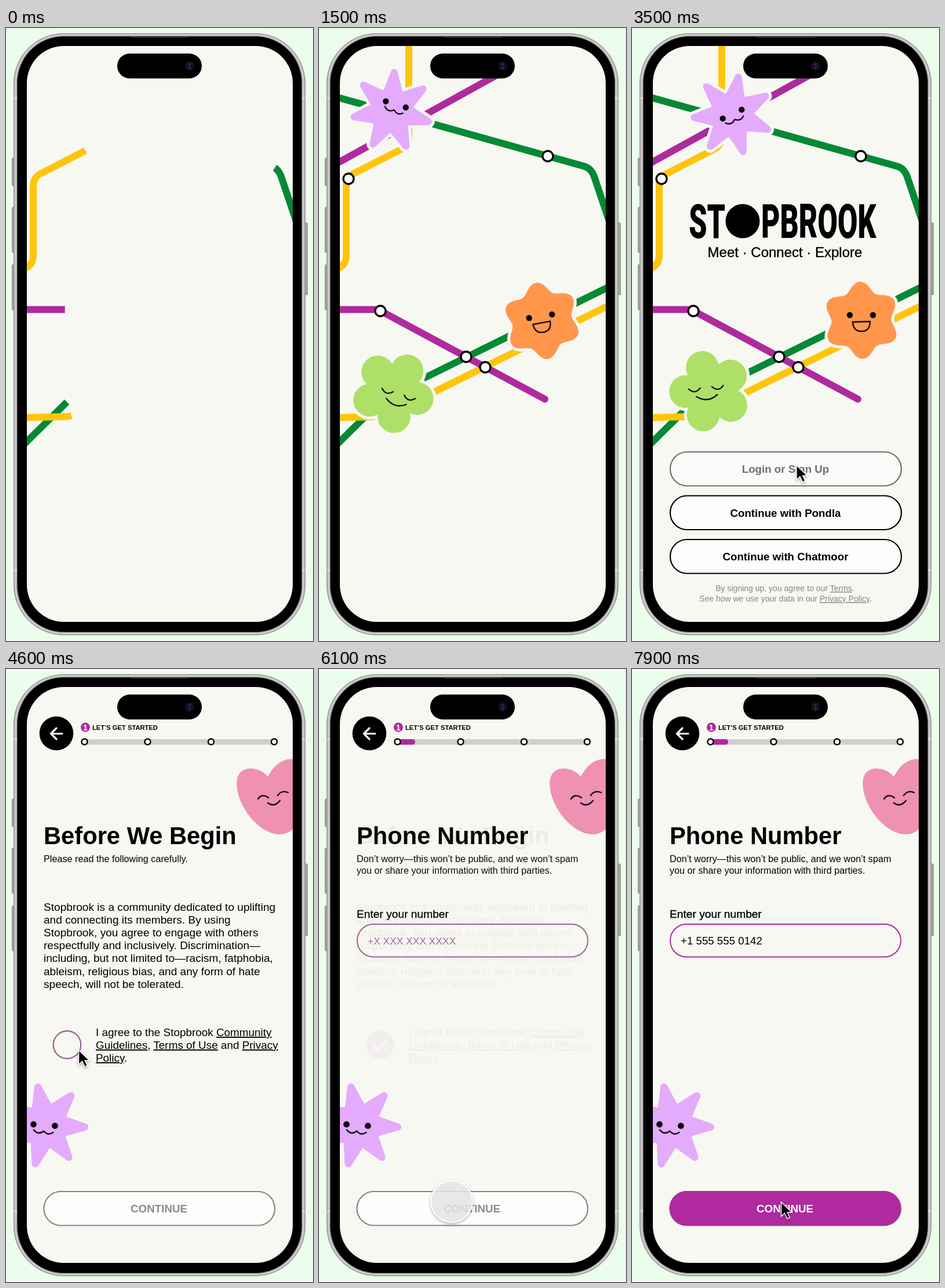
Write an HTML page that moves like this. It is 530 px wide and 1057 px high and loops after 8000 ms.

```html
<!DOCTYPE html>
<html lang="en">
<head>
<meta charset="utf-8">
<title>Onboarding</title>
<style>
html, body { margin: 0; width: 100%; height: 100%; overflow: hidden; background: #ebfdeb; }
svg { display: block; width: 530px; height: 1057px; font-family: "Liberation Sans", Arial, sans-serif; }
.line { fill: none; stroke-width: 12; stroke-linejoin: round; stroke-dasharray: 1 1; }
.stop { fill: #fff; stroke: #000; stroke-width: 3.3; }
.face { fill: none; stroke: #0c0a14; stroke-width: 2.3; stroke-linecap: round; stroke-linejoin: round; }
.face circle { fill: #000; stroke: none; }
.b { font-weight: bold; }
.m { stroke: #000; stroke-width: .35; }
.mid { text-anchor: middle; }
.u { text-decoration: underline; text-decoration-thickness: 1px; text-underline-offset: 3px; }
.pill { fill: #fdfdfd; stroke: #000; stroke-width: 2.2; }
.shade { filter: drop-shadow(0 2px 2px #0005); }
</style>
</head>
<body>
<svg viewBox="0 0 530 1057">
  <defs>
    <clipPath id="clip"><rect x="36" y="31" width="459" height="993" rx="64"/></clipPath>
  </defs>

  <g fill="#a5a3a2" stroke="#777" stroke-width=".8">
    <rect x="10.500" y="224" width="5" height="48" rx="1.500"/>
    <rect x="10.500" y="309" width="5" height="78" rx="1.500"/>
    <rect x="10.500" y="408" width="5" height="78" rx="1.500"/>
    <rect x="515" y="336" width="5.500" height="124" rx="1.500"/>
  </g>
  <rect x="13.500" y="9.500" width="503" height="1037" rx="86" fill="#aeacab" stroke="#918f8e"/>
  <rect x="16.500" y="12" width="497" height="1032" rx="83" fill="none" stroke="#d0cdcb" stroke-width="2.500"/>
  <path d="M14 121h5M511 121h5M14 935h5M511 935h5" stroke="#dddbd9" stroke-width="3"/>
  <rect x="19.500" y="14.500" width="491" height="1027" rx="80" stroke="#4a4848"/>
  <path d="M216 15.500H315" stroke="#333" stroke-width="2.500" stroke-linecap="round"/>
  <rect x="36" y="31" width="459" height="993" rx="64" fill="#f7f8f2"/>

  <g clip-path="url(#clip)">
    <g id="home">
      <g id="lines"></g>
      <g id="stops"></g>
      <g id="cast"></g>
      <g id="brand">
        <g font-family="Roboto, sans-serif" font-weight="900" font-size="50" transform="translate(0 362) scale(1 1.63)">
          <text x="161" text-anchor="end">ST</text>
          <text x="223">PBROOK</text>
        </g>
        <circle cx="191" cy="333" r="29.500"/>
        <text class="mid m" x="264" y="395" font-size="24">Meet · Connect · Explore</text>
      </g>
      <g id="login">
        <g id="first">
          <rect class="pill" x="66" y="731" width="399" height="58.500" rx="29"/>
          <text class="mid b" x="265" y="767" font-size="18.700">Login or Sign Up</text>
        </g>
        <rect class="pill" x="66" y="806.500" width="399" height="58.500" rx="29"/>
        <text class="mid b" x="265" y="842.500" font-size="18.700">Continue with Pondla</text>
        <rect class="pill" x="66" y="882" width="399" height="58.500" rx="29"/>
        <text class="mid b" x="265" y="918" font-size="18.700">Continue with Chatmoor</text>
        <g class="mid" font-size="14" fill="#858585">
          <text x="264" y="971">By signing up, you agree to our <tspan class="u">Terms</tspan>.</text>
          <text x="265" y="989">See how we use your data in our <tspan class="u">Privacy Policy</tspan>.</text>
        </g>
      </g>
    </g>

    <g id="form">
      <circle cx="87" cy="111" r="29.300"/>
      <path d="M97 111.500H78M87 102L77.500 111.500L87 121" fill="none" stroke="#fff" stroke-width="3.200" stroke-linecap="round" stroke-linejoin="round"/>
      <circle cx="137" cy="100.500" r="8" fill="#ae2a9e"/>
      <text class="mid b" x="137" y="105.500" font-size="14" fill="#fff">1</text>
      <text class="b" x="149" y="105" font-size="11.200">LET’S GET STARTED</text>
      <path d="M135 125.800H463" stroke="#cfcfcf" stroke-width="9.600"/>
      <rect id="bar" x="135" y="121" height="9.600" rx="4.500" fill="#ae2a9e"/>
      <g id="dots" class="stop" style="stroke-width:2.500"></g>
      <path d="M452 186C440 169 404 163 399 190C393 226 430 281 469 285C497 287 512 260 520 220C525 180 510 150 485 156C466 161 458 175 452 186Z" fill="#ee91b3"/>
      <path class="face" d="M435 224Q442 214 453 222M469 218Q476 208 487 213M452 231Q463 239 473 227"/>
      <g id="buddy"></g>

      <g id="terms">
        <text class="b" x="65" y="302" font-size="41.700">Before We Begin</text>
        <text x="65" y="333" font-size="16.200">Please read the following carefully.</text>
        <g id="body" font-size="19.100"></g>
        <g font-size="18.900">
          <text x="155" y="633">I agree to the Stopbrook <tspan class="u">Community</tspan></text>
          <text x="155" y="655"><tspan class="u">Guidelines</tspan>, <tspan class="u">Terms of Use</tspan> and <tspan class="u">Privacy</tspan></text>
          <text x="155" y="677"><tspan class="u">Policy</tspan>.</text>
        </g>
        <circle id="box" cx="105.500" cy="648" r="23.800" fill="#ae2a9e" stroke="#9b5c96" stroke-width="2.200"/>
        <path id="tick" d="M95 649L102 658L116 639" fill="none" stroke="#fff" stroke-width="3.200" stroke-linecap="round"/>
      </g>

      <g id="phone">
        <text class="b" x="65" y="302" font-size="41.700">Phone Number</text>
        <g font-size="16.200">
          <text x="65" y="333">Don’t worry—this won’t be public, and we won’t spam</text>
          <text x="65" y="353">you or share your information with third parties.</text>
        </g>
        <text class="m" x="65" y="428.500" font-size="19.200">Enter your number</text>
        <rect id="field" x="66" y="440" width="398" height="56.500" rx="28" fill="none" stroke-width="2"/>
        <text id="number" x="84" y="474.500"></text>
      </g>

      <rect class="pill" x="65.500" y="901" width="398.500" height="58.500" rx="29" style="stroke:#858585"/>
      <text class="mid b" x="264" y="936.500" font-size="18.800" fill="#8a8a8a">CONTINUE</text>
      <g id="active">
        <rect x="64.500" y="900" width="400" height="60" rx="30" fill="#ae2a9e"/>
        <text class="mid b" x="264" y="936.500" font-size="18.800" fill="#fff">CONTINUE</text>
      </g>
    </g>

    <path id="arrow" class="shade" d="M0 0V25L6 19.500L10.500 29L15 27L10.800 18H18.500Z" stroke="#fff" stroke-width="1.500"/>
    <circle id="touch" class="shade" r="36" fill="#f4f3f3" fill-opacity=".8" stroke="#fff" stroke-width="2"/>
  </g>

  <rect x="192" y="44" width="146" height="43" rx="21.500"/>
  <circle cx="317" cy="65.500" r="8" fill="#140f1f"/>
  <circle cx="317" cy="62.500" r="2.200" fill="#33264d"/>
  <circle cx="317" cy="68.500" r="2" fill="#3d2b52"/>
</svg>

<script>
const LOOP = 8000, STEP = 100;
const BG = '#f7f8f2', PURPLE = '#ae2a9e', GREEN = '#048934', YELLOW = '#fec50c';
const $ = id => document.getElementById(id);
const clamp = (v, a = 0, b = 1) => Math.min(b, Math.max(a, v));
const ramp = (t, a, b) => clamp((t - a) / (b - a));
const out = u => 1 - (1 - u) ** 2;
const rad = a => a * Math.PI / 180;
const polar = (r, a) => [r * Math.cos(rad(a)), r * Math.sin(rad(a))];
const range = n => [...Array(n).keys()];

// Smooth curve through rows of [time, ...values], without overshoot.
function track(rows, t) {
  t = clamp(t, rows[0][0], rows.at(-1)[0]);
  const i = Math.max(0, rows.findIndex(r => r[0] >= t) - 1);
  const a = rows[i], b = rows[i + 1], d = b[0] - a[0], u = (t - a[0]) / d;
  const secant = (j, c) => (rows[j + 1][c] - rows[j][c]) / (rows[j + 1][0] - rows[j][0]);
  const slope = (j, c) => {
    if (j === 0 || j === rows.length - 1) return 0;
    const p = secant(j - 1, c), q = secant(j, c);
    return p * q > 0 ? 2 * p * q / (p + q) : 0;
  };
  return a.slice(1).map((v, k) => {
    const c = k + 1, w = 1 - u;
    return v * w * w * (1 + 2 * u) + b[c] * u * u * (3 - 2 * u)
      + d * u * w * (w * slope(i, c) - u * slope(i + 1, c));
  });
}

// Colour, share drawn at the start, path.
const lines = [
  [GREEN, .2, 'M505 345L475 256Q470 242 458 238.500L30 119'],
  [PURPLE, -.15, 'M30 234L320 74'],
  [YELLOW, .57, 'M30 416Q47 409 47 393V272Q47 259 58 252L142 209Q155 202 155 188V20'],
  [GREEN, .195, 'M28 721L104 646Q112 638 122 633L505 444'],
  [YELLOW, .16, 'M30 672L104 670Q115 669 124 664.600L505 476'],
  [PURPLE, .18, 'M30 485.500H102L390 640']
];
$('lines').innerHTML = lines.map(([color, , d]) =>
  `<path class="line" pathLength="1" stroke="${color}" d="${d}"/>`).join('');

const stops = [[51, 260], [395, 221], [106, 488], [254, 567], [287, 585]];
$('stops').innerHTML = stops.map(() => '<circle class="stop" r="9"/>').join('');
$('dots').innerHTML = [135.5, 244.5, 354, 463].map(x => `<circle cx="${x}" cy="125.500" r="5"/>`).join('');

const mix = (p, q, u) => p.map((v, i) => v + (q[i] - v) * u);
const starPath = 'M' + range(7).map(k => {
  const a = k * 360 / 7, tip = polar(66, a), dip = polar(29, a + 180 / 7), next = polar(66, a + 360 / 7);
  return `${tip}L${mix(tip, dip, .78)}Q${dip} ${mix(next, dip, .78)}`;
}).join('L') + 'Z';
const blobPath = 'M' + range(120).map(k => polar(59 + 7.5 * Math.cos(rad(k * 18)), k * 3)).join('L') + 'Z';
const disc = ([x, y], r) => `M${x - r} ${y}a${r} ${r} 0 1 1 ${2 * r} 0a${r} ${r} 0 1 1 ${-2 * r} 0Z`;
const flowerPath = range(5).map(k => disc(polar(43, k * 72), 28.3)).join('') + disc([0, 0], 36);

const eyes = x => `<circle cx="${-x}" r="5.200"/><circle cx="${x}" r="5.200"/>`;
const starFace = eyes(18) + '<path d="M-17 9Q-9 18 0 10Q8 18 16 11"/>';

// Keys: time, x, y, body turn, face dx, face dy, face turn.
const cast = [
  { fill: '#e4aafc', path: starPath, edge: 12, face: starFace, keys: [
    [600, -60, 92, -90, 7, -11, -40], [1500, 125.6, 142.7, 16.5, 7, -11, 17],
    [2300, 161, 149, 13, 6, -9.5, 14], [3500, 173, 150, 22, 0, -1.5, -25]] },
  { fill: '#ff964c', path: blobPath, edge: 0,
    face: eyes(20) + '<path d="M-15 12L15 11Q15 28 0 28Q-14 28 -15 12Z"/>', keys: [
    [600, 580, 410, 60, -2, -8, 60], [1300, 383, 506, -41, -2.5, -8, -11],
    [1500, 385, 505, -39, -2.5, -8, -9], [2300, 394, 504, -33, -1, -8.5, -1], [3500, 396, 504, -32, 0, -9, 0]] },
  { fill: '#aedf67', path: flowerPath, edge: 0,
    face: '<path d="M-30 -2q10 11 20 0M10 -2q10 11 20 0M-18 12.500Q0 26 18 12.500"/>', keys: [
    [600, -60, 690, -80, 9, 5, -60], [1500, 128, 627, 16, 9, 5, 17],
    [2300, 134, 624.5, 16, 8.5, 4.5, 17], [3500, 135.5, 626, 35, -7.5, -4.5, -6]] }
];
const figure = ({ fill, path, edge, face }) => `<g><g>
  <path d="${path}" stroke="${BG}" stroke-width="${edge + 10}" stroke-linejoin="round"/>
  <path d="${path}" fill="${fill}" stroke="${fill}" stroke-width="${edge}" stroke-linejoin="round"/>
  </g><g class="face">${face}</g></g>`;
const place = (node, [x, y, turn, dx, dy, faceTurn], size = 1) => {
  node.setAttribute('transform', `translate(${x} ${y}) scale(${size})`);
  node.children[0].setAttribute('transform', `rotate(${turn})`);
  node.children[1].setAttribute('transform', `translate(${dx} ${dy}) rotate(${faceTurn})`);
};
$('cast').innerHTML = cast.map(figure).join('');
$('buddy').innerHTML = figure(cast[0]);
place($('buddy').firstChild, [68, 787.5, 2, -2, -1, 4], 1.03);

$('body').innerHTML = ['Stopbrook is a community dedicated to uplifting',
  'and connecting its members. By using', 'Stopbrook, you agree to engage with others',
  'respectfully and inclusively. Discrimination—', 'including, but not limited to—racism, fatphobia,',
  'ableism, religious bias, and any form of hate', 'speech, will not be tolerated.'
].map((s, i) => `<text x="65" y="${417 + i * 22.1}">${s}</text>`).join('');

const pointer = [[2700, 400, 1090], [3300, 284, 754], [3700, 284, 754], [4500, 125.5, 657], [5000, 125.5, 657],
  [5600, 229, 918], [6300, 229, 918], [6700, 240, 472], [7000, 240, 472], [7700, 257.5, 919], [8000, 257.5, 919]];
const taps = [[3600, 3900], [4700, 4900], [5800, 6300], [6700, 6900]];
const digits = '+1 555 555 0142';

const show = (id, v) => { $(id).style.opacity = v; $(id).style.display = v > 0 ? '' : 'none'; };

function draw(t) {
  lines.forEach(([, start], i) => {
    const p = clamp(start + (1 - start) * ramp(t, 0, 900)), node = $('lines').children[i];
    node.style.strokeDashoffset = 1 - p;
    node.style.strokeLinecap = p === 1 ? 'round' : 'butt';
  });
  stops.forEach(([x, y], i) =>
    $('stops').children[i].setAttribute('transform',
      `translate(${x} ${y}) scale(${out(ramp(t, 700 + i * 60, 1000 + i * 60))})`));
  cast.forEach((c, i) => place($('cast').children[i], track(c.keys, t)));

  const toForm = out(ramp(t, 3700, 4200)), toPhone = out(ramp(t, 5800, 6180));
  show('brand', out(ramp(t, 1700, 2500)));
  show('login', ramp(t, 2500, 2900));
  $('first').style.opacity = 1 - .45 * ramp(t, 3200, 3400);
  show('home', 1 - toForm);
  show('form', toForm);
  show('terms', 1 - toPhone);
  show('phone', toPhone);
  $('bar').setAttribute('width', 31 * ramp(t, 5800, 6100));

  const checked = ramp(t, 4800, 5000);
  $('box').setAttribute('fill-opacity', checked);
  show('tick', checked);

  const typed = clamp(Math.floor((t - 6850) / 40), 0, digits.length), number = $('number');
  number.textContent = typed ? digits.slice(0, typed) : '+X XXX XXX XXXX';
  number.setAttribute('fill', typed ? '#000' : '#a0609a');
  number.setAttribute('font-size', typed ? 18.7 : 17.4);
  $('field').setAttribute('stroke', t < 6800 ? '#9b5c96' : PURPLE);
  show('active', t < 6500 ? checked * (1 - ramp(t, 5800, 6100)) : ramp(t, 7400, 7600));

  const at = `translate(${track(pointer, t).join(' ')})`;
  const press = Math.max(...taps.map(([a, b]) => Math.min(ramp(t, a, a + 100), 1 - ramp(t, b - 100, b))));
  $('arrow').setAttribute('transform', at);
  $('touch').setAttribute('transform', at);
  show('arrow', 1 - press);
  show('touch', press);
}

const began = performance.now();
function frame() {
  const t = (performance.now() - began) % LOOP;
  draw(Math.floor(t / STEP) * STEP);
  requestAnimationFrame(frame);
}
frame();
</script>
</body>
</html>
```
